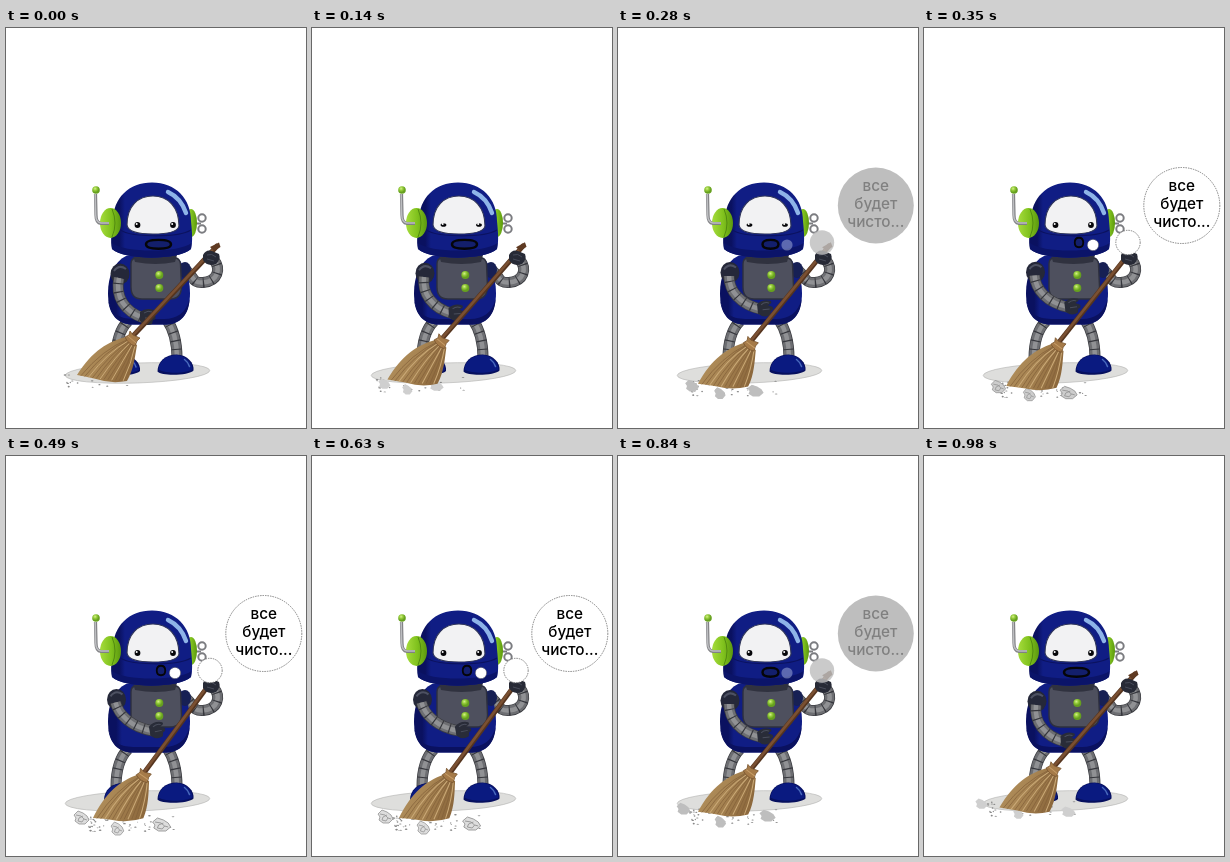
Animation, 300 px wide and 400 px high, one loop 1.05 s. Source, as an HTML page:

```html
<!DOCTYPE html>
<html lang="ru">
<head>
<meta charset="utf-8">
<title>Робот с метлой</title>
<style>
html, body { margin: 0; width: 100%; height: 100%; overflow: hidden; background: #fff; }
svg { display: block; width: 100vw; height: 100vh; }
text { font: 500 15.3px Inter, "Open Sans", sans-serif; text-anchor: middle; }
.edge, .core, .glow, .rings { fill: none; }
.edge { stroke: #3c3d42; stroke-width: 11; }
.core { stroke: #6d6e72; stroke-width: 9.6; }
.glow { stroke: #909194; stroke-width: 4.5; }
.rings { stroke: #36373d; stroke-width: 10; stroke-dasharray: 1.2 7.4; stroke-dashoffset: -5; }
</style>
</head>
<body>
<svg viewBox="0 0 300 400">
  <defs>
    <linearGradient id="navy"><stop offset="0" stop-color="#0a1160"/><stop offset=".1" stop-color="#0a1160"/><stop offset=".17" stop-color="#101d84"/><stop offset="1" stop-color="#101d84"/></linearGradient>
    <radialGradient id="knob" cx=".38" cy=".32"><stop offset="0" stop-color="#d5f08a"/><stop offset=".5" stop-color="#93cb38"/><stop offset="1" stop-color="#66a01f"/></radialGradient>
    <linearGradient id="ear"><stop offset="0" stop-color="#a6dc3c"/><stop offset=".55" stop-color="#7fc11d"/><stop offset="1" stop-color="#5b980f"/></linearGradient>
    <linearGradient id="straw" x2="1" y2=".4"><stop offset="0" stop-color="#b3925f"/><stop offset=".55" stop-color="#a88553"/><stop offset="1" stop-color="#8d693d"/></linearGradient>
    <g id="foot">
      <path d="M-18 7C-18-3-10-10 1-10C12-10 19-1 18 6C14 11-14 12-18 7Z" fill="#060f5e"/>
      <path d="M-17 5C-16-4-9-9 1-9.500C11-9 17-1 17 5C10 9-9 9.500-17 5Z" fill="#0a1a80"/>
      <path d="M9-5Q13-2 14 2" fill="none" stroke="#4a6bbd" stroke-width="1.5" stroke-linecap="round"/>
    </g>
  </defs>

  <ellipse cx="131.5" cy="345" rx="72.3" ry="10" transform="rotate(-2 131 345)" fill="#dededc" stroke="#b2b2b0" stroke-width=".6"/>
  <g id="crumbs" fill="#868686"></g>
  <g id="balls"></g>

  <g data-tube="M122 293C114 301 110 314 110 331"></g>
  <g data-tube="M161 292C168 302 171 314 171 330"></g>
  <use href="#foot" x="116" y="337"/>
  <use href="#foot" x="169.5" y="336.5"/>

  <g data-tube="M180 242C189 250 186 255 197 254.500C212 253 215 241 208 232"></g>

  <path d="M120 228C108 234 102 248 102 265C102 286 112 296.500 127 296.500H160C176 296 184 284 184 265C184 247 177 233 168 228Z" fill="url(#navy)"/>
  <path d="M102 270C105 290 119 291 132 291H158C171 291 180 285 183.500 271C183 287 174 296.500 160 296.500H127C112 296.500 103 287 102 270Z" fill="#0a1160"/>
  <ellipse cx="179" cy="242" rx="6" ry="8" fill="#172054"/>
  <path d="M129 230Q150 235 170 230Q174 231 174.500 236L175.500 259Q175 271 164 271H136Q125 271 125 259V236Q125 231 129 230Z" fill="#4e505e" stroke="#2e303e" stroke-width="1.4"/>
  <path d="M127 227H171L169 234Q150 238 129 234Z" fill="#30323f"/>
  <circle cx="153.3" cy="247" r="4" fill="url(#knob)"/>
  <circle cx="153.3" cy="260" r="4" fill="url(#knob)"/>

  <g fill="none" stroke="#7b7c80" stroke-width="2">
    <circle cx="196" cy="190" r="3.7"/><circle cx="196" cy="201" r="3.7"/><path d="M187 195.5H195"/>
  </g>
  <ellipse cx="185" cy="195" rx="6" ry="14" fill="url(#ear)"/>

  <path d="M107 193C107 170 123 154.500 146 154.500C170 154.500 185 171 185 193C186 203 187 213 185 221C173 232.500 118 232.500 106 221C104 213 106 203 107 193Z" fill="url(#navy)"/>
  <path d="M106 215C118 225 173 225 185.500 215L185 221C173 232.500 118 232.500 106 221Z" fill="#0b1469"/>
  <path d="M112 200C120 210 172 210 185 202" fill="none" stroke="#0b1260" stroke-width="1.2"/>
  <path d="M121 197C121 178 132 168 147 168C162 168 173 179 173 198C172 203.500 161 206 147 206C133 206 122 204 121 197Z" fill="#f2f2f3" stroke="#30365a" stroke-width="1.2"/>
  <path d="M162 164Q175 170 180 185" fill="none" stroke="#8eb4e8" stroke-width="4.4" stroke-linecap="round"/>
  <g id="eyes">
    <g transform="translate(131.500 197)"></g><g transform="translate(167 197)"></g>
  </g>
  <path id="lip" fill="#131f6c" stroke="#050508" stroke-width="2.4" stroke-linejoin="round"/>

  <ellipse cx="104.500" cy="195" rx="10.500" ry="15" fill="url(#ear)"/>
  <path d="M106 181Q112 195 106 209" fill="none" stroke="#528a10" stroke-width="1"/>
  <path d="M103 195.500H95Q90 195 90 187L89.500 166" fill="none" stroke="#808184" stroke-width="3.2"/>
  <path d="M103 195H95Q90 194.500 89.700 187L89.200 166" fill="none" stroke="#bcbdc0" stroke-width="1.5"/>
  <circle cx="90" cy="162" r="3.800" fill="url(#knob)"/>

  <g id="shoulder">
    <ellipse cx="114" cy="246" rx="9.500" ry="10.500" fill="#252839"/>
    <path d="M108 243Q113 236 120 241" fill="none" stroke="#4d5162" stroke-width="2"/>
  </g>
  <g id="arm" data-tube="M113 250C109 268 118 284 138 290"></g>
  <g id="hand">
    <path d="M-8-5Q-2-10 6-7Q8-5 3-3L7-1Q9 2 5 3L4 7Q-3 10-8 4Z" fill="#292c38"/>
    <path d="M-4-4Q0-7 4-5M-3 1H4" fill="none" stroke="#4a4e5c" stroke-width="1"/>
  </g>

  <g id="broom">
    <path d="M212 217L126 309" stroke="#55341e" stroke-width="4.800"/>
    <path d="M211.600 216.600L125.600 308.600" stroke="#7a5032" stroke-width="2.600"/>
    <path d="M204 219L213 214.500L214.500 219L208 223Z" fill="#5f3a22"/>
    <path d="M120 309C103 313 86 323 71 347Q82 349 90 351Q105 356 121 353C128 341 129 328 131 317Z" fill="url(#straw)"/>
    <g id="strands" fill="none"></g>
    <path d="M119 309L123 307L124 303L127 307L134 310L131 313L129 318Q122 316 119 309Z" fill="#a57a48" stroke="#7a5630" stroke-width=".8"/>
    <path d="M122 308L130 315" stroke="#c69c66" stroke-width="1"/>
  </g>
  <path d="M197 227Q200 221 206 223L213 226Q215 231 210 236Q201 239 197 232Z" fill="#272a36"/>
  <path d="M201 227Q206 225 210 229M201 231L208 233" fill="none" stroke="#474b59" stroke-width="1"/>

  <g id="speech">
    <g id="bubbles" stroke-width=".8">
      <circle cx="169" cy="217" r="5.600"/><circle cx="204" cy="214.500" r="12.200"/><circle cx="257.800" cy="177.500" r="38"/>
    </g>
    <g id="words"><text x="257.800" y="163">все</text><text x="257.800" y="181">будет</text><text x="257.800" y="199">чисто...</text></g>
  </g>
</svg>
<script>
const STEP = 70, COUNT = 15;
const $ = id => document.getElementById(id);
const set = (el, attrs) => { for (const name in attrs) el.setAttribute(name, attrs[name]); };
const add = (parent, tag, attrs) => {
  const el = document.createElementNS('http://www.w3.org/2000/svg', tag);
  set(el, attrs);
  return parent.appendChild(el);
};
const mix = (a, b, u) => a + (b - a) * u;
const rgb = v => `rgb(${v},${v},${v})`;

let seed = 17;
const rand = () => (seed = seed * 16807 % 2147483647) / 2147483647;

// Ribbed limbs are stacked strokes of one path.
for (const limb of document.querySelectorAll('[data-tube]'))
  for (const cls of ['edge', 'core', 'glow', 'rings'])
    add(limb, 'path', { class: cls, d: limb.dataset.tube });

for (const eye of $('eyes').children) {
  add(eye, 'circle', { r: 2.9, fill: '#07070a' });
  add(eye, 'circle', { cx: -.8, cy: -.9, r: 1, fill: '#fff' });
}

for (let i = 1; i < 13; i++) {
  const u = i / 13;
  const x = mix(71, 121, u), y = mix(347, 353, u) + Math.sin(u * Math.PI) * 1.3;
  add($('strands'), 'path', {
    d: `M${mix(121, 130, u)} ${mix(311, 317, u)}Q${mix(94, 128, u)} ${mix(320, 337, u)} ${x} ${y}`,
    stroke: i % 3 ? '#83613a' : '#cbaa78', 'stroke-width': i % 3 ? .7 : 1
  });
}

for (let i = 0; i < 60; i++)
  add($('crumbs'), 'ellipse', {
    cx: mix(81, 168, Math.pow(rand(), 1.2)), cy: mix(359, 376, rand()),
    rx: mix(.6, 1.5, rand()), ry: mix(.4, .8, rand())
  });

const times = [0, 3, 5, 7, 9, 12, 14];
const paths = [
  { x: [70, 73, 74, 75, 73, 65, 57], y: [354, 357, 359, 362, 361, 353, 348], w: 1 },
  { x: [89, 98, 105, 111, 111, 102, 94], y: [357, 364, 367, 373, 372, 366, 358], w: .85 },
  { x: [112, 130, 144, 155, 159, 149, 144], y: [352, 361, 365, 369, 368, 360, 356], w: 1.2 }
];
const track = (values, k) => {
  let i = 0;
  while (i < times.length - 2 && times[i + 1] <= k) i++;
  return mix(values[i], values[i + 1], (k - times[i]) / (times[i + 1] - times[i]));
};

const balls = paths.map(() => {
  const g = add($('balls'), 'g', {});
  add(g, 'path', { d: 'M-7-3L-3-7L2-5L6-2L8 2L4 6L-2 6L-6 3L-5 0Z' });
  add(g, 'path', { d: 'M-5-3L0-2L3 1L1 4L-3 3L-2 0L2-2M3 1L6 2', fill: 'none' });
  return g;
});

// Mouth: a wide lens that shrinks to a ring.
function lips(cx, cy, w, h) {
  const a = w / 2, b = h / 2, c = a * .55;
  return `M${cx - a} ${cy}C${cx - a} ${cy - b * .8} ${cx - c} ${cy - b} ${cx} ${cy - b}` +
    `S${cx + a} ${cy - b * .8} ${cx + a} ${cy}S${cx + c} ${cy + b} ${cx} ${cy + b}S${cx - a} ${cy + b * .8} ${cx - a} ${cy}Z`;
}

function pose(k) {
  const q = 8 - Math.abs(k - 8), u = q / 8, solid = q >= 5;

  set($('broom'), { transform: `rotate(${-.95 * q} 209 217)` });
  const hx = mix(142, 153, u), hy = mix(289, 272, u);
  const arm = `M${mix(113, 109, u)} ${mix(250, 246, u)}C${mix(109, 113, u)} ${mix(268, 257, u)} ${mix(118, 125, u)} ${mix(284, 269, u)} ${hx - 4} ${hy + 1}`;
  for (const p of $('arm').children) set(p, { d: arm });
  set($('hand'), { transform: `translate(${hx} ${hy}) rotate(${-12 * u})` });
  set($('shoulder'), { transform: `translate(${-4 * u} ${-3 * u})` });

  set($('lip'), {
    d: solid ? lips(155, 214.5, 8.5, 9.5) : lips(152.5, 216.3, q < 3 ? 25 : 16, 8.8),
    'stroke-width': solid ? 1.8 : 2.4
  });

  const open = k === 3 ? .22 : k === 2 || k === 4 ? .6 : 1;
  for (const eye of $('eyes').children) {
    set(eye.firstChild, { transform: `scale(1 ${open})` });
    set(eye.lastChild, { opacity: open < .5 ? 0 : 1 });
  }

  balls.forEach((ball, i) => {
    const p = paths[i], s = mix(.7, 1, Math.min(1, q / 6));
    set(ball, {
      transform: `translate(${track(p.x, k)} ${track(p.y, k)}) scale(${p.w * s} ${s})`,
      fill: rgb(solid ? 205 + (q - 5) * 8 : q < 3 ? 207 : 190),
      stroke: solid ? '#929292' : 'none', 'stroke-width': .8,
      visibility: q ? 'visible' : 'hidden'
    });
  });
  const dx = track(paths[1].x, k) - 111, dy = track(paths[1].y, k) - 373;
  set($('crumbs'), { transform: `translate(${dx} ${dy})` });
  [...$('crumbs').children].forEach((c, i) => set(c, { opacity: i < 16 + 6 * q ? 1 : 0 }));

  set($('speech'), { visibility: q < 3 ? 'hidden' : 'visible' });
  const gray = q === 3 ? 196 : 190;
  const [small, mid, big] = $('bubbles').children;
  set($('bubbles'), { stroke: solid ? '#666' : 'none', 'stroke-dasharray': '1.5 1' });
  set(small, { fill: solid ? '#fff' : '#c9d5ef', 'fill-opacity': solid ? 1 : .42 });
  set(mid, { fill: solid ? '#fff' : rgb(gray), 'fill-opacity': solid ? 1 : .82 });
  set(big, { fill: solid ? '#fff' : rgb(gray) });
  set($('words'), { fill: solid ? '#000' : rgb(q === 3 ? 154 : 128) });
}

let last = -1;
function tick() {
  const k = Math.floor(performance.now() / STEP) % COUNT;
  if (k !== last) pose(last = k);
  requestAnimationFrame(tick);
}
tick();
</script>
</body>
</html>
```
